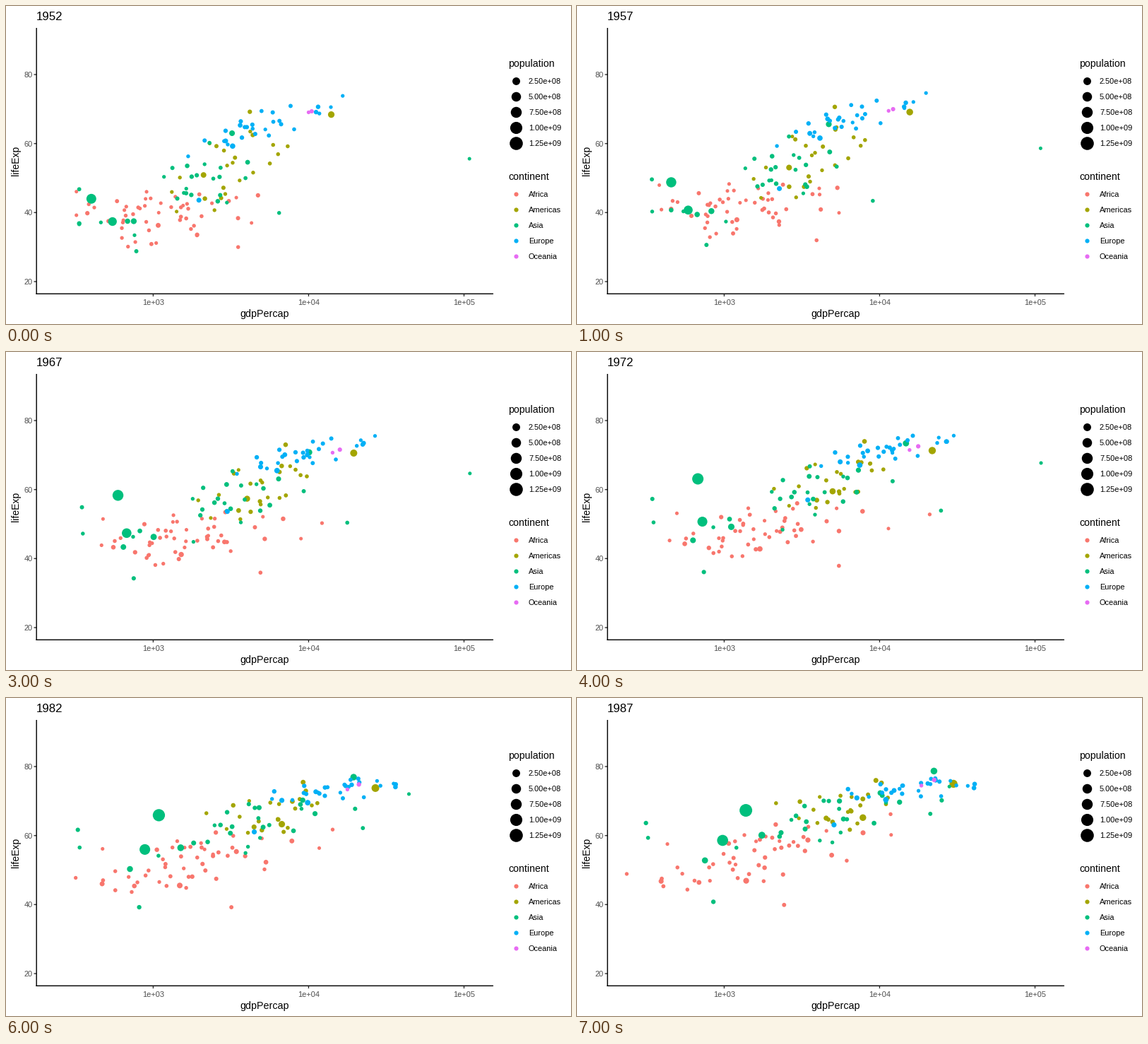
These frames come from a looping animation (800x450 px, 8 s). A matplotlib script:

```python
import numpy as np
import matplotlib.pyplot as plt
from matplotlib.animation import FuncAnimation

W, H, DPI = 800, 450, 100
YEARS = np.arange(1952, 1988, 5)
COLORS = {"Africa": "#F8766D", "Americas": "#A3A500", "Asia": "#00BF7D",
          "Europe": "#00B0F6", "Oceania": "#E76BF3"}

# Crowd per continent: count, typical millions, yearly growth, mid-path bend
# (log income, years of life), then at start and end:
# log income mean and spread, life mean, slope against log income, scatter
CROWD = {
    "Africa": (47, 4, .027, 0, .5, (3.0, .26, 39.3, 5, 4.4), (3.14, .32, 53.6, 12, 4.6)),
    "Americas": (23, 6, .022, .08, .9, (3.5, .2, 53.3, 22, 6.3), (3.76, .21, 68.3, 10, 3.8)),
    "Asia": (25, 10, .021, .03, .9, (3.17, .34, 47, 14, 5), (3.6, .46, 65, 10, 4)),
    "Europe": (29, 9, .006, .06, 1.5, (3.7, .25, 65, 16, 2.2), (4.21, .23, 73.7, 5, 1.4)),
    "Oceania": (2, 6, .015, .04, -.7, (4.01, .01, 69.2, 5, .1), (4.31, .03, 75.3, 20, .2)),
}

# Large or outlying countries: millions, then income and life in 1952, 1972, 1987
LEADERS = {
    "Africa": [(51, 1077, 36.3, 1698, 42.8, 1385, 46.9),
               (22, 4725, 45, 7766, 53.7, 7826, 60.8),
               (2, 2388, 42.7, 21011, 52.8, 11771, 66.2),
               (.5, 4294, 37, 11402, 48.7, 11864, 60.2),
               (6, 3521, 30, 5473, 37.9, 2430, 39.9)],
    "Americas": [(98, 2109, 50.9, 4986, 59.5, 7807, 65.2),
                 (195, 13990, 68.4, 21806, 71.3, 29884, 75)],
    "Asia": [(800, 400, 44, 677, 63.1, 1379, 67.3),
             (545, 547, 37.4, 724, 50.7, 977, 58.6),
             (118, 750, 37.5, 1111, 49.2, 1748, 60.1),
             (104, 3217, 63, 14779, 73.4, 22376, 78.7),
             (71, 684, 37.5, 630, 45.3, 752, 52.8),
             (13, 779, 28.8, 740, 36.1, 852, 40.8),
             (6, 6460, 39.9, 24838, 53.9, 21198, 66.3),
             (.8, 108382, 55.6, 109348, 67.7, 28118, 74.2)],
    "Europe": [(36, 1969, 43.6, 3451, 57, 5089, 63.1)],
}


def x_px(log_gdp):
    return 208.4 + 220.05 * (log_gdp - 3)


def y_px(life):
    return 97 + 4.883 * (80 - life)


def dot_size(millions):
    """Marker area in points squared."""
    size = 1 + 5 * np.sqrt(np.asarray(millions) / 1318.7)
    return ((1.89 + 2.845 * size) * 72 / DPI) ** 2


def spread(rng, n):
    z = rng.normal(size=n)
    return np.clip((z - z.mean()) / z.std(), -1.9, 2.1)


def drift(rng, z, keep):
    """Partly keep each point's standing, partly reshuffle it."""
    return keep * z + np.sqrt(1 - keep ** 2) * spread(rng, len(z))


def crowd_paths(rng, name):
    n, typical, _, bend_x, bend_y, first, last = CROWD[name]
    rich, fit = spread(rng, n), spread(rng, n)

    def place(stats, rich, fit):
        mean, dev, life, slope, noise = stats
        return mean + dev * rich, life + slope * dev * rich + noise * fit

    g0, l0 = place(first, rich, fit)
    g1, l1 = place(last, drift(rng, rich, .85), drift(rng, fit, .7))
    t = ((YEARS - 1952) / 35)[:, None]
    hump = 4 * t * (1 - t)
    if name == "Africa":
        bend_x = np.maximum(0, .17 - .4 * (g1 - g0))  # stagnating incomes peak midway
    log_gdp = g0 + (g1 - g0) * t + bend_x * hump
    life = l0 + (l1 - l0) * t + bend_y * hump
    millions = np.clip(typical * np.exp(.9 * spread(rng, n)), .3, 75)
    return log_gdp, life, millions


def leader_path(row):
    keys = [1952, 1972, 1987]
    log_gdp = np.interp(YEARS, keys, np.log10(row[1::2]))
    life = np.interp(YEARS, keys, row[2::2])
    if row[0] == 800:
        life[YEARS == 1962] -= 9  # famine
    return log_gdp[:, None], life[:, None], np.array(row[:1])


def build():
    rng = np.random.default_rng(12)
    xs, ys, sizes, colors = [], [], [], []
    for name in COLORS:
        growth = (1 + CROWD[name][2]) ** (YEARS - 1970.0)
        paths = [crowd_paths(rng, name)]
        paths += [leader_path(row) for row in LEADERS.get(name, [])]
        for log_gdp, life, millions in paths:
            xs.append(x_px(log_gdp))
            ys.append(y_px(life))
            sizes.append(dot_size(growth[:, None] * millions))
            colors += [COLORS[name]] * len(millions)
    return np.hstack(xs), np.hstack(ys), np.hstack(sizes), colors


plt.rcParams["font.family"] = "Liberation Sans"
fig = plt.figure(figsize=(W / DPI, H / DPI), dpi=DPI, facecolor="white")
ax = fig.add_axes([0, 0, 1, 1])
ax.set_xlim(0, W)
ax.set_ylim(H, 0)
ax.axis("off")


def line(x, y, color):
    ax.plot(x, y, color=color, lw=1.42 * 72 / DPI, solid_capstyle="butt", snap=False)


def label(x, y, text, px=11, color="black", **kw):
    return ax.text(x, y, text, fontsize=px * 72 / DPI, color=color, va="baseline", **kw)


for life in range(20, 81, 20):
    y = y_px(life)
    line([39.5, 43.2], [y, y], "#333333")
    label(37.5, y + 4, str(life), color="#4D4D4D", ha="right")
for power in range(3, 6):
    x = x_px(power)
    line([x, x], [407.3, 411], "#333333")
    label(x, 423, f"1e+0{power}", color="#4D4D4D", ha="center")
line([43.2, 43.2], [31, 408], "black")
line([42.5, 690], [407.3, 407.3], "black")
label(366.5, 440, "gdpPercap", 14.2, ha="center")
label(18, 219, "lifeExp", 14, ha="center", rotation=90, rotation_mode="anchor")

label(711, 86, "population", 14.1)
label(711, 246, "continent", 14.1)
for i, (name, color) in enumerate(COLORS.items()):
    millions = 250 * (i + 1)
    y = 105.8 + 22.05 * i
    ax.scatter(722, y, s=dot_size(millions), color="black", lw=0)
    label(740, y + 4, f"{millions * 1e6:.2e}")
    y += 160
    ax.scatter(722, y, s=(6.16 * 72 / DPI) ** 2, color=color, lw=0)
    label(740, y + 4, name)

xs, ys, sizes, colors = build()
dots = ax.scatter(xs[0], ys[0], s=sizes[0], c=colors, lw=0, zorder=3)
title = label(43, 20, "1952", 16.7)


def update(i):
    dots.set_offsets(np.column_stack([xs[i], ys[i]]))
    dots.set_sizes(sizes[i])
    title.set_text(str(YEARS[i]))
    return dots, title


anim = FuncAnimation(fig, update, frames=len(YEARS), interval=1000,
                     repeat=True, repeat_delay=0, blit=False)
plt.show()
```
